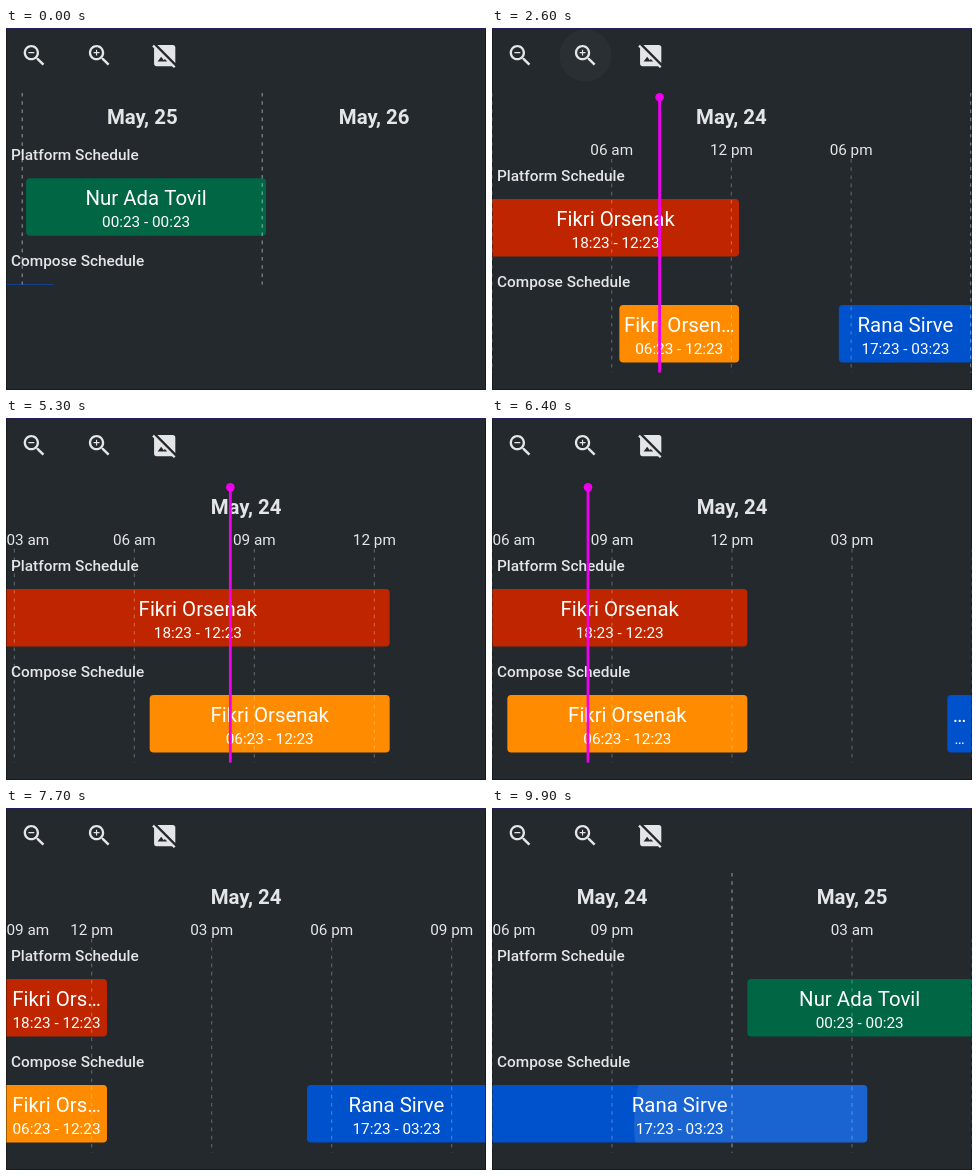
Animation, 480 px wide and 362 px high, one loop 10000 ms. Source, as an HTML page with a canvas:

```html
<!DOCTYPE html>
<html lang="en">
<head>
<meta charset="utf-8">
<title>Schedule</title>
<style>
html, body { margin: 0; width: 100%; height: 100%; overflow: hidden; background: #24292e; }
canvas { display: block; }
</style>
</head>
<body>
<canvas id="stage" width="480" height="362"></canvas>
<script>
const ctx = document.getElementById('stage').getContext('2d');
const W = 480, H = 362, LOOP = 10000;
const FAMILY = 'Roboto, "Noto Sans", sans-serif';
const INK = '#e4e5e7';
const ZOOM_1 = 2300, ZOOM_2 = 3500, NOW = 8.4;
const HOURS_ROW = 20.7;

// Hours are counted from May 24, 00:00.
const M = 23 / 60;
const lanes = [
  { name: 'Platform Schedule', events: [
    { title: 'Fikri Orsenak', time: '18:23 - 12:23', from: -6 + M, to: 12 + M, color: '#bf2600' },
    { title: 'Nur Ada Tovil', time: '00:23 - 00:23', from: 24 + M, to: 48 + M, color: '#006644' }
  ] },
  { name: 'Compose Schedule', events: [
    { title: 'Fikri Orsenak', time: '06:23 - 12:23', from: 6 + M, to: 12 + M, color: '#ff8b00' },
    { title: 'Rana Sirve', time: '17:23 - 03:23', from: 17 + M, to: 27 + M, color: '#0052cc', pressed: true }
  ] }
];

const LENS = 'M15.5 14h-.79l-.28-.27C15.41 12.59 16 11.11 16 9.5 16 5.91 13.09 3 9.5 3S3 5.91 3 9.5 5.91 16 9.5 16' +
  'c1.61 0 3.09-.59 4.23-1.57l.27.28v.79l5 4.99L20.49 19l-4.99-5z' +
  'M9.5 14C7.01 14 5 11.99 5 9.5S7.01 5 9.5 5 14 7.01 14 9.5 11.99 14 9.5 14z';
const icons = [
  { x: 28.3, path: new Path2D(LENS + 'M7 9h5v1H7z') },
  { x: 93.5, path: new Path2D(LENS + 'M7 9h2v-2h1v2h2v1h-2v2h-1v-2H7z') },
  { x: 158.7, path: new Path2D('M21 5c0-1.1-.9-2-2-2H5.83L21 18.17V5z' +
    'M2.81 2.81L1.39 4.22 3 5.83V19c0 1.1.9 2 2 2h13.17l1.61 1.61 1.41-1.41z' +
    'M6 17l3-4 2.25 3 .82-1.1 2.1 2.1z') }
];

const clamp = (v, a, b) => Math.min(b, Math.max(a, v));
const ramp = (t, a, b) => clamp((t - a) / (b - a), 0, 1);
const smooth = (t, a, b) => { const p = ramp(t, a, b); return p * p * (3 - 2 * p); };

function viewAt(t) {
  const settle = (start, size) => t < start ? size : size * Math.exp((start - t) / 50);
  const span = 12 + settle(ZOOM_1, 24) + settle(ZOOM_2, 12);
  const left = 22.4 * (1 - ramp(t, 0, 1900)) ** 2 +
    6 * (smooth(t, 4500, 6180) + smooth(t, 7000, 8175) + smooth(t, 8250, 9404));
  const step = t < ZOOM_1 ? 24 : t < ZOOM_2 ? 6 : 3;
  return { left, span, step, right: left + span, x: h => (h - left) * W / span };
}

function setFont(size, weight) {
  ctx.font = `${weight} ${size}px ${FAMILY}`;
}

function text(str, x, y, align, color = INK) {
  ctx.textAlign = align;
  ctx.fillStyle = color;
  ctx.fillText(str, x, y);
}

function fit(str, room) {
  const width = s => ctx.measureText(s).width;
  if (width(str) <= room) return str;
  let n = str.length;
  while (n > 0 && width(str.slice(0, n) + '…') > room) n--;
  return width('…') <= room ? str.slice(0, n) + '…' : '';
}

function disc(x, y, r, color) {
  ctx.fillStyle = color;
  ctx.beginPath();
  ctx.arc(x, y, r, 0, Math.PI * 2);
  ctx.fill();
}

function drawToolbar(t) {
  for (const start of [ZOOM_1, ZOOM_2]) {
    const age = t - start;
    if (age >= 0 && age < 500) {
      const alpha = 0.08 * (1 - ramp(age, 100, 400));
      disc(93.5, 27.5, 12 + 14 * ramp(age, 0, 200), `rgba(255,255,255,${alpha})`);
    }
  }
  for (const { x, path } of icons) {
    ctx.save();
    ctx.translate(x, 27.6);
    ctx.scale(1.18, 1.18);
    ctx.translate(-12, -12);
    ctx.fillStyle = INK;
    ctx.fill(path, 'evenodd');
    ctx.restore();
  }
}

function drawDays(view) {
  setFont(20.4, 700);
  for (let d = Math.floor(view.left / 24); d * 24 < view.right; d++) {
    const a = Math.max(0, view.x(d * 24)), b = Math.min(W, view.x(d * 24 + 24));
    const full = 'May, ' + (24 + d);
    const label = [full, 'May,'].find(s => ctx.measureText(s).width + 16 <= b - a);
    if (label) text(label, (a + b) / 2, 96, 'center');
  }
}

function hourLabel(h) {
  const hour = ((h % 24) + 24) % 24;
  return String(hour % 12 || 12).padStart(2, '0') + (hour < 12 ? ' am' : ' pm');
}

function drawHours(view) {
  setFont(15.3, 400);
  const { step } = view;
  for (let h = Math.floor(view.left / step) * step; h < view.right - 0.1; h += step) {
    if (h % 24 === 0) continue;
    const label = hourLabel(h), w = ctx.measureText(label).width;
    // The leading label sticks to the edge until the next line reaches it.
    if (view.x(h + step) > w) text(label, Math.max(w / 2 + 0.4, view.x(h)), 127, 'center');
  }
}

function drawEvent(ev, view, y, t) {
  const x0 = view.x(ev.from), x1 = view.x(ev.to);
  const a = Math.max(0, x0), b = Math.min(W, x1);
  if (b <= a) return;
  ctx.save();
  ctx.beginPath();
  const l = x0 < 0 ? 0 : 4, r = x1 > W ? 0 : 4;
  ctx.roundRect(a, y, b - a, 57.5, [l, r, r, l]);
  ctx.fillStyle = ev.color;
  ctx.fill();
  ctx.clip();
  if (ev.pressed && t > 9700) {
    disc(302, y + 38, 20 + 140 * ramp(t, 9700, 9900), 'rgba(255,255,255,0.1)');
  }
  const mid = (a + b) / 2, room = b - a - 8;
  setFont(20.4, 400);
  text(fit(ev.title, room), mid, y + 26.5, 'center', '#fff');
  setFont(15.3, 400);
  text(fit(ev.time, room), mid, y + 48.5, 'center', '#fff');
  ctx.restore();
}

function dashed(x, top, bottom, color) {
  ctx.strokeStyle = color;
  ctx.lineWidth = 1.2;
  ctx.setLineDash([3.6, 4.6]);
  ctx.beginPath();
  ctx.moveTo(x, top);
  ctx.lineTo(x, bottom);
  ctx.stroke();
  ctx.setLineDash([]);
}

function drawLines(view, bottom) {
  for (let h = Math.ceil(view.left / view.step) * view.step; h <= view.right; h += view.step) {
    const day = h % 24 === 0;
    dashed(view.x(h), day ? 65 : 131, bottom, day ? 'rgba(255,255,255,0.45)' : 'rgba(255,255,255,0.25)');
  }
  const x = view.x(NOW);
  if (x > -5 && x < W + 5) {
    ctx.fillStyle = '#ee00ee';
    ctx.fillRect(x - 1.4, 69, 2.8, bottom - 69);
    disc(x, 69.3, 4.3, '#ee00ee');
  }
}

function drawFrame() {
  ctx.strokeStyle = 'rgba(0,0,0,0.35)';
  ctx.lineWidth = 1;
  ctx.strokeRect(0.5, 0.5, W - 1, H - 1);
  ctx.fillStyle = '#251e58';
  ctx.fillRect(0, 0, W, 1.5);
}

function draw(t) {
  const view = viewAt(t);
  const shift = t < ZOOM_1 ? 0 : HOURS_ROW;
  const bottom = 256.6 + 67.5 * ramp(t, 0, 250) + shift;
  ctx.fillStyle = '#24292e';
  ctx.fillRect(0, 0, W, H);
  drawToolbar(t);

  ctx.save();
  ctx.beginPath();
  ctx.rect(0, 60, W, bottom - 60);
  ctx.clip();
  drawDays(view);
  if (shift) drawHours(view);
  lanes.forEach((lane, i) => {
    const y = shift + i * 106;
    lane.events.forEach(ev => drawEvent(ev, view, y + 150.3, t));
    setFont(15.4, 500);
    text(lane.name, 5, y + 131.8, 'left');
  });
  drawLines(view, bottom);
  ctx.restore();
  drawFrame();
}

function tick() {
  draw(performance.now() % LOOP);
  requestAnimationFrame(tick);
}
tick();
</script>
</body>
</html>
```
